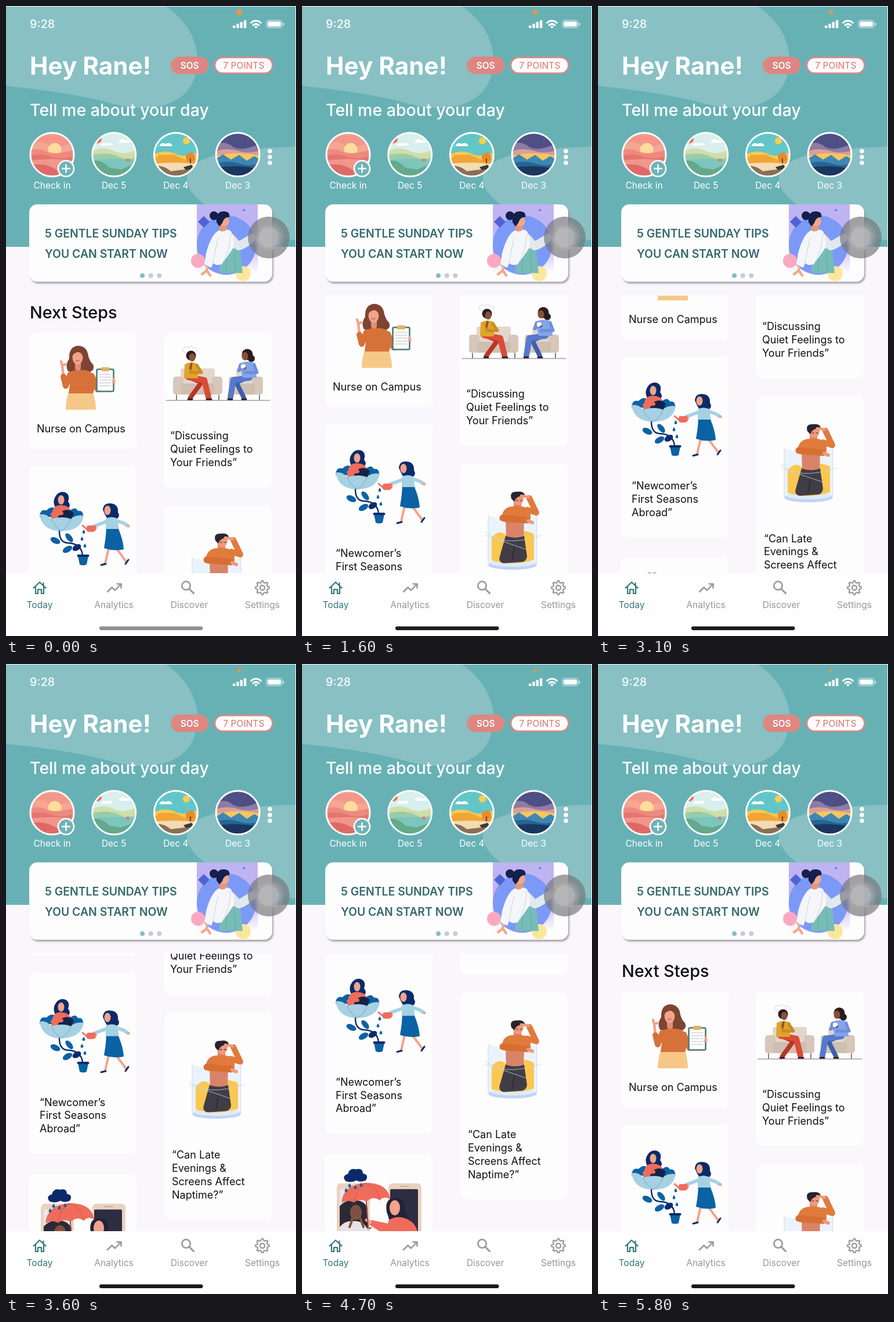
An HTML page that plays this animation: 500x1083 px, repeating every 5.9 s.

```html
<!DOCTYPE html>
<html lang="en">
<head>
<meta charset="utf-8">
<title>Wellbeing app</title>
<style>
html, body { margin: 0; width: 100%; height: 100%; overflow: hidden; background: #f9f7fb; }
svg { display: block; width: 100vw; height: 100vh; font-family: Inter, Roboto, sans-serif; }
</style>
</head>
<body>
<svg id="stage" viewBox="0 0 500 1083" preserveAspectRatio="none"></svg>
<script>
const P = (d, fill) => `<path d="${d}" fill="${fill}"/>`;
const L = (d, color, w = 2) =>
  `<path d="${d}" fill="none" stroke="${color}" stroke-width="${w}" stroke-linecap="round" stroke-linejoin="round"/>`;
const C = (x, y, r, fill, extra = '') => `<circle cx="${x}" cy="${y}" r="${r}" fill="${fill}" ${extra}/>`;
const E = (x, y, rx, ry, fill, turn = 0) =>
  `<ellipse cx="${x}" cy="${y}" rx="${rx}" ry="${ry}" fill="${fill}" transform="rotate(${turn} ${x} ${y})"/>`;
const R = (x, y, w, h, fill, r = 0, extra = '') =>
  `<rect x="${x}" y="${y}" width="${w}" height="${h}" rx="${r}" fill="${fill}" ${extra}/>`;
const T = (x, y, text, size, weight, fill, anchor = 'start') =>
  `<text x="${x}" y="${y}" font-size="${size}" font-weight="${weight}" fill="${fill}" text-anchor="${anchor}">${text}</text>`;
const lines = (x, y, rows) => rows.map((row, i) => T(x, y + i * 22.8, row, 18, 400, '#101012')).join('');
const card = (x, y, w, h) => R(x, y, w, h, '#fefdfe', 11);

const TEAL = '#67b1b5', PALE = '#88c0c4', CORAL = '#de8682', GREY = '#98979b', DEEP = '#34777a';
const NAVY = '#0b2a6b', BLUE = '#0b62a4', ICE = '#a6d1e3', RED = '#ef6c5b', SKIN = '#f2a48a';

function statusBar() {
  const bars = [0, 1, 2, 3].map(i => R(391 + i * 6.3, 33.5 - i * 3, 4.4, 4.5 + i * 3, '#fff', 1)).join('');
  return T(41, 38, '9:28', 19.5, 600, '#edf6f6') + bars +
    L('M422.5 29 Q431 21.5 439.5 29', '#fff', 3) + L('M426 33 Q431 28.8 436 33', '#fff', 3) +
    P('M428 35.5 Q431 33 434 35.5 L431 38.5Z', '#fff') +
    R(449, 24.5, 27, 13, 'none', 4, 'stroke="#d5e9ea" stroke-width="1.2"') +
    R(451, 26.5, 23, 9, '#fff', 2.5) + R(477.5, 29, 2, 4.5, '#d5e9ea', 1);
}

function scenes() {
  const art = [
    R(40, 216, 80, 80, '#f5a592') + P('M40 236 Q58 230 72 238 T120 234 V226 Q90 218 40 226Z', '#f3978a') +
      C(84, 247, 11.5, '#fddc9c') + P('M40 249 Q54 243 70 250 T120 247 V296 H40Z', '#ee8a7d') +
      P('M40 258 Q58 252 78 259 T120 256 V296 H40Z', '#e67570') +
      P('M40 266 Q80 260 120 266 V296 H40Z', '#f1968a') + P('M40 274 Q70 268 90 284 L92 296 H40Z', '#de6a68'),
    R(147, 216, 80, 80, '#d9efed') + C(158, 229, 7, '#e9705f') +
      P('M163 240 q4 -7 10 -3 q8 -5 11 3z M195 232 q5 -6 11 -1 q8 -1 8 4 h-20z', '#fff') +
      P('M147 250 Q165 240 185 249 T227 245 V296 H147Z', '#cfdfa8') +
      P('M147 257 Q175 249 195 259 T227 255 V296 H147Z', '#9accab') +
      P('M147 266 Q175 260 227 265 V296 H147Z', '#7cc6bd') +
      P('M147 267 Q164 262 178 278 L198 281 L227 270 V296 H147Z', '#64a98c') + C(210, 265, 3, '#d98078'),
    R(254, 216, 80, 80, '#62c6c8') + C(311, 232, 6, '#fbcf4e') +
      P('M264 241 q4 -8 11 -4 q9 -4 12 4z', '#fff') +
      P('M254 255 Q275 246 292 254 T334 250 V296 H254Z', '#f9c953') +
      P('M254 265 L264 256 L290 256 L308 264 L334 262 V296 H254Z', '#f0a535') +
      C(318, 260, 8, '#e98a2d') + R(317, 262, 2, 14, '#6a3f2b') +
      P('M254 271 Q290 267 334 272 V296 H254Z', '#f3dcb2') + P('M254 275 Q272 273 284 284 L334 278 V296 H254Z', '#8a6f58') +
      P('M306 277 l14 -4 4 6 -14 3z', '#3b3838'),
    R(360, 216, 80, 80, '#4e4f85') + P('M360 240 Q376 230 390 241 T440 236 V262 H360Z', '#8f7ba6') +
      P('M360 250 Q382 243 400 249 T440 248 V270 H360Z', '#d9a095') + P('M360 258 Q400 248 440 258 V266 H360Z', '#f6c75e') +
      P('M360 264 L374 255 L388 264 L402 256 L415 266 L428 258 L440 265 V296 H360Z', '#3e86b4') +
      P('M360 272 Q382 264 402 271 T440 269 V296 H360Z', '#256591') +
      P('M360 279 Q390 271 440 280 V296 H360Z', '#1b3760')
  ];
  const names = ['Check in', 'Dec 5', 'Dec 4', 'Dec 3'];
  return art.map((a, i) => {
    const x = 79.5 + i * 106.7;
    return `<clipPath id="disc${i}">${C(x, 255.5, 38, '#000')}</clipPath><g clip-path="url(#disc${i})">${a}</g>` +
      C(x, 255.5, 37.5, 'none', 'stroke="#fff" stroke-width="3"') + T(x, 314, names[i], 15.5, 400, '#fff', 'middle');
  }).join('') +
    C(103.5, 279.5, 13.5, '#6fb3b6', 'stroke="#fff" stroke-width="2.6"') + L('M97 279.5 h13 M103.5 273 v13', '#fff', 2.4) +
    [249.5, 259.5, 269.5].map(y => C(455, y, 3.8, '#fff')).join('');
}

function banner() {
  return `<linearGradient id="lilac" x2="0" y2="1"><stop offset=".55" stop-color="#bfb4f2"/><stop offset="1" stop-color="#fdfdfe"/></linearGradient>
    <filter id="soft" x="-5%" y="-10%" width="110%" height="125%"><feGaussianBlur stdDeviation="1.6"/></filter>` +
    R(42, 345, 419, 132, '#8b8a92', 14, 'filter="url(#soft)" opacity=".75"') + R(40, 341, 419, 133, '#fdfdfe', 14) +
    T(67, 398, '5 GENTLE SUNDAY TIPS', 19.4, 600, '#35696c') + T(67, 433, 'YOU CAN START NOW', 19.4, 600, '#35696c') +
    ['#86bcc6', '#cbcacf', '#cbcacf'].map((c, i) => C(235 + i * 14.7, 463.5, 4, c)).join('') +
    R(329, 341, 105, 118, 'url(#lilac)') + C(380, 411, 51, '#7c99f8') +
    P('M341 361 l10 10 -10 10 -10 -10z', '#4f63d8') + L('M410 349 v4 M408 351 h4', '#4f63d8', 1.2) +
    C(331, 438, 12, '#fca9c0') + C(409, 460, 13, '#fce79a') +
    P('M370 424 Q388 408 404 420 L408 459 H368Z', '#77bcb7') + L('M380 430 L379 457 M394 426 L396 457', '#5fa6a3', 1) +
    L('M349 440 L346 455 L338 461 M347 456 L352 463', '#f0a987', 4.5) + L('M428 396 L435 393 L436 387', '#f0a987', 4) +
    P('M384 386 Q394 394 402 404 L427 389 L432 400 Q412 420 400 420 L386 412Z', '#e1e9ee') +
    P('M361 390 Q372 380 387 386 Q396 400 392 416 L372 444 Q362 447 357 442 L354 450 L342 444 Q346 408 361 390Z', '#f4f6f9') +
    L('M366 398 Q360 420 357 442 M387 392 Q388 416 372 444', '#cdd6de', 1) +
    P('M367 372 L368 386 Q375 390 381 384 L380 372Z', '#e5977a') + E(377, 369, 7.5, 9.5, '#f0a987', -8) +
    C(358.5, 360.5, 7.5, '#141f4b') + P('M363 372 Q361 353 375 353 Q387 353 385 363 Q376 362 373 373 L368 379Z', '#141f4b');
}

function header() {
  return R(0, 1, 499, 413, TEAL) +
    P('M0 137 C66 145 122 151 180 167 C240 183 297 176 320 135 C340 97 333 40 276 1 H0Z', PALE) +
    P('M499 242 C450 243 375 246 331 268 C300 286 308 318 345 342 C390 372 450 398 499 403Z', PALE) +
    statusBar() + T(41, 118, 'Hey Rane!', 42.2, 700, '#fff') +
    R(284, 87, 65.5, 30, CORAL, 15) + T(316.7, 107.5, 'SOS', 15.4, 600, '#fff', 'middle') +
    R(360, 88.5, 99.5, 27, '#fefdfe', 13.5, `stroke="${CORAL}" stroke-width="2.6"`) +
    T(410, 107.5, '7 POINTS', 15.5, 500, CORAL, 'middle') +
    T(41, 189, 'Tell me about your day', 28.5, 500, '#fff') + scenes() + banner();
}

function nurse() {
  return P('M107 628 Q101 618 109 606 Q108 585 125 584 Q140 585 142 602 Q145 612 150 616 Q154 626 144 629Z', '#7d4431') +
    P('M108 664 H150 Q155 680 155 694 H103 Q103 678 108 664Z', '#f6c888') +
    L('M99 636 L97 618 L95 611 M97 618 L102 616', SKIN, 4.5) + L('M111 633 L103 653 L99 637', '#d6713a', 10) +
    P('M106 631 Q124 622 144 628 Q155 634 155 650 L150 666 H108 L110 650Z', '#d6713a') +
    P('M119 612 h10 v12 q-5 6 -10 0z', '#e08f73') + E(123.5, 604, 9, 12.5, SKIN) +
    P('M113 604 Q114 590 126 591 Q134 592 134 606 Q130 594 124 595 Q116 596 113 604Z', '#7d4431') +
    L('M120 609 q3 2 6 0', '#b3473c', 1.2) + L('M148 636 L158 659 L172 656', '#d6713a', 10) +
    R(156.5, 624.5, 29, 38, '#fff', 2, 'stroke="#4d7a72" stroke-width="2.6"') + R(164, 621, 14, 7, '#e2b068', 2) +
    [633, 638, 643, 648, 653].map(y => L(`M161 ${y} h20`, '#b5b9bd', 1.2)).join('') +
    L('M185 641 l2 3 M184 646 l3 1', SKIN, 3.5);
}

function sofa(x, w) {
  return R(x + 13, 623, w - 26, 36, '#e3d7cd', 4) + R(x, 637, 18, 31, '#d6c7ba', 5) + R(x + w - 18, 637, 18, 31, '#d6c7ba', 5) +
    R(x + 14, 649, w - 28, 19, '#cfbfb1', 2) + L(`M${x + 6} 669 v8 M${x + w - 6} 669 v8`, '#6d5c52', 1.6);
}

function couple() {
  const brown = '#8a4f36', dark = '#2a1c1f';
  return sofa(288, 85) + sofa(384, 59) + L('M276 678 H455', '#77727a', 1.2) +
    L('M304 591 q4 -8 10 -3 q6 -7 9 0 q8 -3 7 5 q-8 6 -14 1 q-8 5 -12 -3', '#e3e2e6', 1.4) +
    L('M320 640 L337 647 L318 673', '#b93528', 8) + L('M314 638 L342 643 L349 672', '#dc4a37', 10) +
    L('M314 676 h7 M346 676 h8', dark, 3) + C(319, 601, 8.5, dark) + E(321, 604, 5.5, 7, brown) +
    P('M308 616 Q320 609 332 616 L331 640 H307Z', '#dfa42e') + L('M329 618 L337 630 L319 630 L318 618', '#c98d20', 5) +
    L('M318 623 l2 -8', brown, 3.5) +
    L('M413 640 L397 647 L410 673', '#3e5fae', 8) + L('M420 639 L392 643 L387 672', '#5479ce', 10) +
    L('M383 676 h7 M407 676 h7', dark, 3) + C(416, 599, 9.5, dark) + C(423, 606, 6, dark) + E(412, 602, 5.5, 7, brown) +
    P('M402 615 Q416 608 430 614 L432 639 H408Z', '#84a4ea') + L('M428 617 L433 630 L412 630 M404 617 L401 627 L409 621', '#6c8fdc', 5) +
    R(405, 616, 8, 7, '#fff', 1.5) + L('M411 624 l2 -2', brown, 3);
}

const drop = (x, y) => P(`M${x} ${y - 4} q5 7 0 7 q-5 0 0 -7z`, BLUE);

function garden() {
  return P('M58 878 Q58 864 70 867 Q78 858 88 865 L112 866 Q120 860 124 868 Q134 866 133 880Z', BLUE) +
    P('M84 860 Q80 850 86 842 Q92 833 102 836 Q111 840 107 852 Q114 860 104 866 L88 867Z', NAVY) +
    E(95, 849, 5.5, 8, SKIN) + P('M80 868 Q84 857 95 858 Q108 858 112 868 L113 882 H78Z', RED) +
    P('M92 872 Q106 860 117 872 L112 884 H88Z', '#152247') + L('M80 874 L96 872', RED, 6) +
    P('M58 874 Q70 872 78 882 Q98 876 112 882 Q120 874 134 876 Q130 902 95 903 Q62 902 58 874Z', ICE) +
    L('M78 882 Q84 896 95 902 M112 882 Q108 896 95 902', '#7fb6d2', 1.2) +
    L('M92 903 Q92 922 106 923 Q130 924 132 944', NAVY, 2.4) +
    E(85, 919, 9, 5, BLUE, 25) + E(109, 914, 9, 4.5, BLUE, 50) + E(106, 934, 9, 5, BLUE, -30) + E(122, 931, 8, 5, NAVY, -30) +
    P('M124 945 H142 L139 960 Q133 963 127 960Z', BLUE) + R(122.5, 943, 21, 4, NAVY, 2) +
    drop(134, 904) + drop(131, 916) + drop(136, 928) +
    L('M177 932 L171 958 M190 932 L207 955', SKIN, 4) + L('M164 961 L172 959 M206 959 L211 952', NAVY, 3) +
    P('M167 866 Q168 854 180 855 Q194 856 193 870 Q198 878 190 882 L174 880 Q170 874 167 866Z', NAVY) +
    E(175, 867, 5.5, 8, SKIN) + L('M174 886 L152 894', ICE, 6) + L('M188 884 L203 889 L209 893', ICE, 6) +
    P('M172 881 Q182 876 192 881 L195 902 H172Z', ICE) + P('M173 899 H194 Q202 918 203 934 Q186 938 169 932 Q172 916 173 899Z', BLUE) +
    C(211, 894, 2.5, SKIN) + R(139, 893, 14, 11, RED, 4) + L('M140 900 L132 893 M152 894 Q158 897 152 902', RED, 2.6);
}

function jar() {
  return P('M321 948 V1031 Q363 1050 405 1031 V948 Q363 962 321 948Z', '#eaf3fc') +
    E(363, 1033, 42, 8, '#c3d3f3') + E(363, 1030, 38, 6, '#dfeafa') +
    P('M327 986 Q340 970 352 982 Q380 968 400 980 V1024 Q363 1036 327 1025Z', '#fbc750') +
    P('M351 955 H383 L382 990 H352Z', '#d98468') +
    P('M351 983 Q368 989 383 983 L388 1018 Q387 1028 376 1028 L348 1030 Q338 1028 341 1018Z', '#413d47') +
    L('M366 1002 L362 1026', '#2b2831', 1.5) +
    P('M365 922 h13 v14 h-13z', '#dc8669') +
    P('M346 944 Q350 932 366 932 Q380 930 394 938 L394 954 Q366 966 341 956Z', '#e07b3c') +
    L('M388 938 L404 943 L392 918', '#e07b3c', 10) +
    E(373, 919, 9, 11.5, '#ee9a7c', 8) + P('M361 919 Q357 906 371 907 Q383 905 385 915 Q370 912 366 924Z', '#29242e') +
    L('M391 916 L378 914', '#ee9a7c', 4.5) + L('M369 922 h3 M376 922 h3', '#29242e', 1.2) +
    L('M346 952 L388 956', '#d66f31', 11) + L('M390 957 L397 960', '#ee9a7c', 6) +
    L('M321 948 V1031 M405 948 V1031', '#cfe0f5', 1.2) + L('M316 976 Q345 1004 412 982 M316 982 L392 1008', '#bcd3ea', .8);
}

function phones() {
  return R(60, 1187, 57, 103, '#ead2c0', 7) + R(65, 1197, 48, 83, '#e9e6ea', 2) +
    R(149, 1187, 57, 103, '#ead2c0', 7) + R(152, 1197, 48, 83, '#2c2d41', 2) +
    L('M82 1192 h14 M170 1192 h14', '#c6a48f', 1.6) +
    P('M65 1280 V1226 Q76 1214 93 1216 Q108 1217 113 1230 V1280Z', '#2b2936') +
    P('M65 1280 V1262 Q74 1250 92 1252 Q106 1252 113 1266 V1280Z', '#e6e3e7') + E(93, 1237, 10, 13, '#81513f') +
    L('M82 1262 Q86 1254 87 1245 M106 1262 L100 1246', '#81513f', 4) +
    P('M146 1236 Q142 1213 160 1212 Q178 1213 176 1232 Q186 1244 178 1254 H152Z', '#232338') +
    E(160, 1229, 9, 13, SKIN) +
    P('M150 1250 Q166 1240 184 1250 Q200 1258 200 1280 H150 L116 1258 L119 1250 L148 1256Z', RED) +
    L('M118 1254 L111 1250', SKIN, 5) + L('M109 1192 L114 1262 q2 5 5 1', '#9d3e43', 2) +
    P('M68 1221 Q70 1190 109 1186 Q148 1186 152 1214 Q142 1208 134 1216 Q122 1208 112 1218 Q98 1212 90 1220 Q78 1214 68 1221Z', RED) +
    L('M109 1187 Q92 1196 90 1220 M109 1187 Q132 1194 134 1216', '#d4554b', 1) +
    P('M75 1183 Q68 1174 79 1171 Q82 1160 93 1163 Q105 1160 105 1170 Q116 1172 110 1182 Q100 1186 94 1182 Q84 1187 75 1183Z', NAVY) +
    drop(82, 1191) + drop(92, 1194) + drop(102, 1190) + drop(76, 1199);
}

function feed() {
  return T(41, 537, 'Next Steps', 28.8, 500, '#0c0c0e') +
    card(40, 562, 185.5, 199) + nurse() + lines(53, 733, ['Nurse on Campus']) +
    card(272, 562, 186.5, 266) + couple() + lines(283, 745, ['“Discussing', 'Quiet Feelings to', 'Your Friends”']) +
    card(40, 790.5, 185.5, 311) + garden() + lines(58, 1019, ['“Newcomer’s', 'First Seasons', 'Abroad”']) +
    card(273, 859, 185.5, 355) + jar() + lines(286, 1109.5, ['“Can Late', 'Evenings &amp;', 'Screens Affect', 'Naptime?”']) +
    card(39, 1136, 185.5, 311) + phones();
}

function gear(x, y) {
  const teeth = Array.from({ length: 32 }, (_, i) => {
    const r = i % 4 < 2 ? 12 : 9, a = (i - .5) * Math.PI / 16;
    return `${(x + r * Math.cos(a)).toFixed(1)} ${(y + r * Math.sin(a)).toFixed(1)}`;
  });
  return L(`M${teeth.join('L')}Z`, GREY, 2.2) + C(x, y, 4, 'none', `stroke="${GREY}" stroke-width="2.3"`);
}

function tabs() {
  const names = ['Today', 'Analytics', 'Discover', 'Settings'], xs = [58, 186, 316, 442];
  return R(0, 975, 500, 108, '#fefefe') +
    names.map((n, i) => T(xs[i], 1035, n, 15.6, 400, i ? GREY : DEEP, 'middle')).join('') +
    L('M47.5 1000.5 L58 990.5 L68.5 1000.5 M51 998.5 V1010 H55 V1003 H61 V1010 H65 V998.5 M64.5 992 V996', DEEP, 2.2) +
    L('M175 1007 L182.5 999.5 L188 1004.5 L198 994 M191.5 993.5 H198.5 V1000.5', GREY, 2.5) +
    C(310.5, 996.5, 7.2, 'none', `stroke="${GREY}" stroke-width="2.6"`) + L('M316 1002 L323.5 1009.5', GREY, 3) +
    gear(442, 1000) + R(161, 1066.5, 178.5, 6.5, '#000', 3.2, 'id="homeBar"');
}

const touch = C(453, 398, 36, '#77777b', 'opacity=".68"') + C(453, 398, 27, '#a3a3a6', 'opacity=".35"') +
  C(453, 398, 22, '#b5b5b8', 'opacity=".4"') + C(453, 398, 17.5, '#c9c9cb', 'opacity=".4"');

const stage = document.getElementById('stage');
stage.innerHTML = R(0, 0, 500, 1083, '#f9f7fb') +
  `<clipPath id="view">${R(0, 498, 500, 477, '#000')}</clipPath><g clip-path="url(#view)"><g id="feed">${feed()}</g></g>` +
  header() + touch + tabs() + C(402, 11, 5, '#f0953c', 'id="micDot"');

const LOOP = 5900, STEP = 100;
const scrollKeys = [[0, 0], [700, 0], [1200, 34], [1600, 72], [2000, 72], [2300, 121], [3100, 188],
  [4100, 323], [4400, 338], [5200, 131.5], [5500, 18], [5700, -1], [5800, -1]];
const dotKeys = [[0, 5], [1200, 4.2], [2300, 3.7], [4100, 2.8], [5800, 2.5]];
const barKeys = [[0, 145], [1200, 55], [1600, 28], [5800, 24]];

// Smooth curve through the keys that never overshoots them.
function curve(keys, t) {
  const slope = i => keys[i + 1] ? (keys[i + 1][1] - keys[i][1]) / (keys[i + 1][0] - keys[i][0]) : 0;
  const tangent = i => {
    const a = i ? slope(i - 1) : 0, b = slope(i);
    return a * b > 0 ? 2 * a * b / (a + b) : 0;
  };
  let i = 0;
  while (i < keys.length - 2 && t > keys[i + 1][0]) i++;
  const [t0, a] = keys[i], [t1, b] = keys[i + 1], h = t1 - t0, u = Math.min(1, (t - t0) / h), v = 1 - u;
  return a * v * v * (1 + 2 * u) + b * u * u * (3 - 2 * u) + h * u * v * (v * tangent(i) - u * tangent(i + 1));
}

const list = document.getElementById('feed');
const homeBar = document.getElementById('homeBar');
const micDot = document.getElementById('micDot');

function draw(ms) {
  const t = Math.floor((ms % LOOP) / STEP) * STEP;
  const shade = Math.round(curve(barKeys, t));
  list.setAttribute('transform', `translate(0 ${-curve(scrollKeys, t)})`);
  homeBar.setAttribute('fill', `rgb(${shade},${shade},${shade})`);
  micDot.setAttribute('r', curve(dotKeys, t));
}

const start = performance.now();
function tick() {
  draw(performance.now() - start);
  requestAnimationFrame(tick);
}
tick();
</script>
</body>
</html>
```
